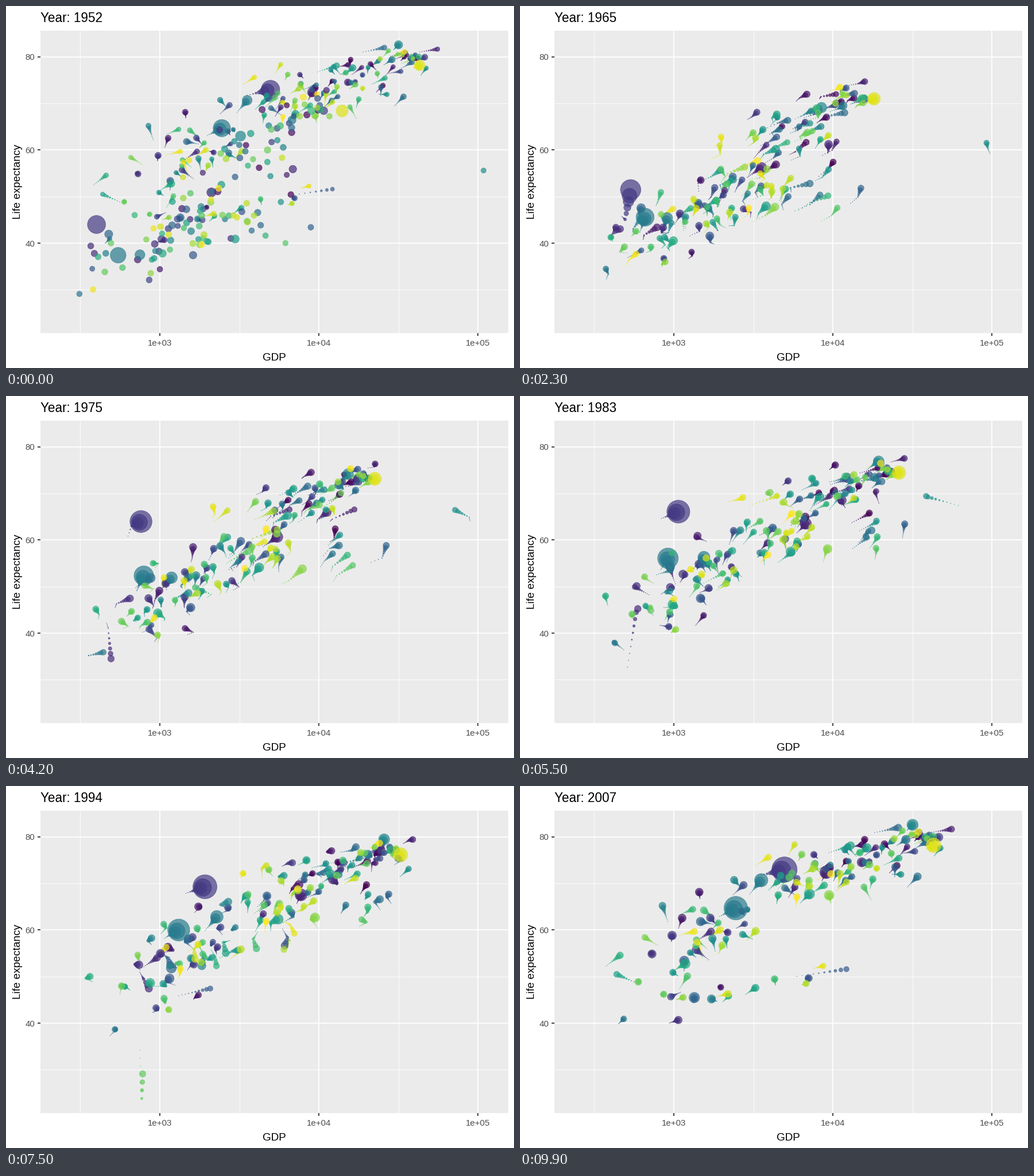
Animation, 885 px wide and 632 px high, one loop 10 s. Source, as a matplotlib script:

```python
import numpy as np
import matplotlib.pyplot as plt
from matplotlib.animation import FuncAnimation

W, H, DPI = 885, 632, 120
FRAMES, STEP_MS, WAKE = 100, 100, 10
PX = 72 / DPI                      # one pixel in points
L, R, T, B = 60, 875, 43, 571      # panel edges
N = 142
KEYS = np.arange(0, FRAMES, 9)     # one key per five years
YEARS = np.linspace(1952, 2007, len(KEYS))

plt.rcParams["font.family"] = "Liberation Sans"
rng = np.random.default_rng(1952)
tracks = {}


def to_x(log_gdp):
    return 268 + 277.15 * (log_gdp - 3)


def to_y(life):
    return 414 - 8.127 * (life - 40)


def spread(values):
    """Resample evenly spaced values onto the key times."""
    return np.interp(KEYS, np.linspace(0, FRAMES - 1, len(values)), values)


def dip(year, depth):
    """A crisis: a sharp drop centred on one year."""
    return depth * np.clip(1 - abs(YEARS - year) / 7, 0, 1)


def decline(depth):
    """A slow fall that starts in the late eighties."""
    t = np.clip((YEARS - 1987) / 17, 0, 1)
    return depth * t * t * (3 - 2 * t)


def track(i, pop, gdp, life, loss=0):
    """Path of one circle; populations in millions."""
    tracks[i] = spread(np.log10(gdp)), spread(life) - loss, spread(pop)


# Circles that stand out by size or by path
track(25, [556, 1000, 1319], [400, 505, 705, 1200, 2160, 4959],
      [44, 62.5, 67.9, 73], dip(1962, 9))
track(59, [372, 1110], [547, 716, 1040, 2452], [37.4, 55, 64.7])
track(135, [158, 301], [13990, 24400, 42952], [68.4, 74, 78.2])
track(60, [82, 224], [750, 985, 1935, 3541], [37.5, 54.5, 70.7])
track(15, [57, 190], [2109, 6500, 9066], [50.9, 62.4, 72.4])
track(67, [86, 127], [3217, 12920, 23750, 31656], [63, 76.2, 82.6])
track(72, [.2, 2.5], [108382, 93000, 87000, 29500, 39000, 47307],
      [55.6, 68.4, 77.6])
track(108, [2.5, 8.9], [493, 700, 863], [40, 45.5, 46.2], dip(1992, 22))
track(19, [4.7, 14], [368, 520, 1714], [39.4, 48, 59.7], dip(1977, 16))
track(41, [.2, .55], [376, 583, 900, 950, 2500, 12154], [34.5, 43, 51.6])

# Everyone else, by group: count, population growth, GDP path, its log
# spread, life expectancy path, its spread (first, last), late decline
GROUPS = [
    (20, 1.3, [8100, 18500, 32500], .11, [68, 73.8, 79.9], [2.5, .9], 0),
    (18, 1.5, [3900, 8300, 12500], .17, [61.5, 70.3, 74.8], [4, 2], 0),
    (22, 2.6, [2700, 4900, 7300], .23, [52, 64.3, 72.8], [8, 3.5], 0),
    (22, 2.8, [1700, 4200, 6000], .35, [46, 60.5, 70.5], [7, 6], 0),
    (5, 5, [4500, 17000, 13000], .15, [42, 59.5, 71], [3, 4], 0),
    (35, 2.8, [960, 1100, 1150], .24, [39.5, 49.5, 56], [4.5, 7], 0),
    (10, 3, [1100, 1800, 2400], .35, [43, 55, 63], [3, 3], 17),
]
free = [i for i in range(1, N + 1) if i not in tracks]
rng.shuffle(free)
for count, growth, gdp, gdp_sd, life, life_sd, fall in GROUPS:
    members, free = free[:count], free[count:]
    for i in members:
        zg, zl, zt = np.clip(rng.normal(size=3), -1.8, 1.8)
        zl = .6 * zg + .8 * zl
        shift = gdp_sd * (zg + zt * np.linspace(-.2, .5, len(KEYS)))
        wobble = rng.normal(0, .035, len(KEYS))
        pop = 4.5 * np.exp(np.clip(rng.normal(), -2, 2))
        g = spread(np.log10(gdp)) + shift + wobble
        e = spread(life) + zl * spread(life_sd) - decline(fall)
        e += rng.normal(0, .09 * life_sd[1], len(KEYS))
        tracks[i] = g, np.minimum(e, 82), spread([pop, pop * growth])

# Position, size and colour of every circle at every frame
times = np.arange(FRAMES)
paths = np.array([[np.interp(times, KEYS, v) for v in tracks[i]]
                  for i in range(1, N + 1)])
xs, ys = to_x(paths[:, 0]), to_y(paths[:, 1])
sizes = 2 + 10 * np.sqrt(np.clip(paths[:, 2] / 1319, 0, 1))
colours = plt.cm.viridis(np.linspace(0, 1, N))
colours[:, 3] = .7

fig = plt.figure(figsize=(W / DPI, H / DPI), dpi=DPI, facecolor="white")
ax = fig.add_axes([0, 0, 1, 1])
ax.set(xlim=(0, W), ylim=(H, 0))
ax.axis("off")
ax.add_patch(plt.Rectangle((L, T), R - L, B - T, fc="#EBEBEB", lw=0, zorder=0))


def line(x, y, width, colour="white"):
    ax.plot(x, y, color=colour, lw=width * PX, zorder=1,
            solid_capstyle="butt")


def label(x, y, text, size, colour="black", **kw):
    return ax.text(x, y, text, fontsize=size, color=colour,
                   va="baseline", **kw)


for g in (2.5, 3.5, 4.5):
    line([to_x(g)] * 2, [T, B], .9)
for e in (30, 50, 70):
    line([L, R], [to_y(e)] * 2, .9)
for g in (3, 4, 5):
    x = to_x(g)
    line([x, x], [T, B], 1.8)
    line([x, x], [B, B + 4.6], 1.8, "#333333")
    label(x, 593, f"1e+{g:02d}", 9, "#4D4D4D", ha="center")
for e in (40, 60, 80):
    y = to_y(e)
    line([L, R], [y, y], 1.8)
    line([L - 4.6, L], [y, y], 1.8, "#333333")
    label(50.5, y + 5.5, str(e), 9, "#4D4D4D", ha="right")

label((L + R) / 2, 619, "GDP", 11.3, ha="center")
label(25, (T + B) / 2, "Life expectancy", 11.3, ha="center",
      rotation=90, rotation_mode="anchor")
title = label(L, 28, "", 13.5)

# Oldest wake first, the present circles on top
ages = np.arange(WAKE - 1, -1, -1)
falloff = (1 - ages / WAKE) ** 3
rgba = np.tile(colours, (WAKE, 1))
dots = ax.scatter(np.zeros(N * WAKE), np.zeros(N * WAKE), c=rgba,
                  edgecolors=rgba, linewidths=.7 * PX, zorder=2)


def draw(frame):
    past = (frame - ages) % FRAMES
    radius = (1.778 * sizes[:, past] + .4) * falloff + .35
    dots.set_offsets(np.column_stack([xs[:, past].T.ravel(),
                                      ys[:, past].T.ravel()]))
    dots.set_sizes((2 * radius.T.ravel() * PX) ** 2)
    title.set_text(f"Year: {round(1952 + 55 * frame / (FRAMES - 1))}")
    return dots, title


anim = FuncAnimation(fig, draw, frames=FRAMES, interval=STEP_MS,
                     init_func=lambda: draw(0), repeat=True)
plt.show()
```
